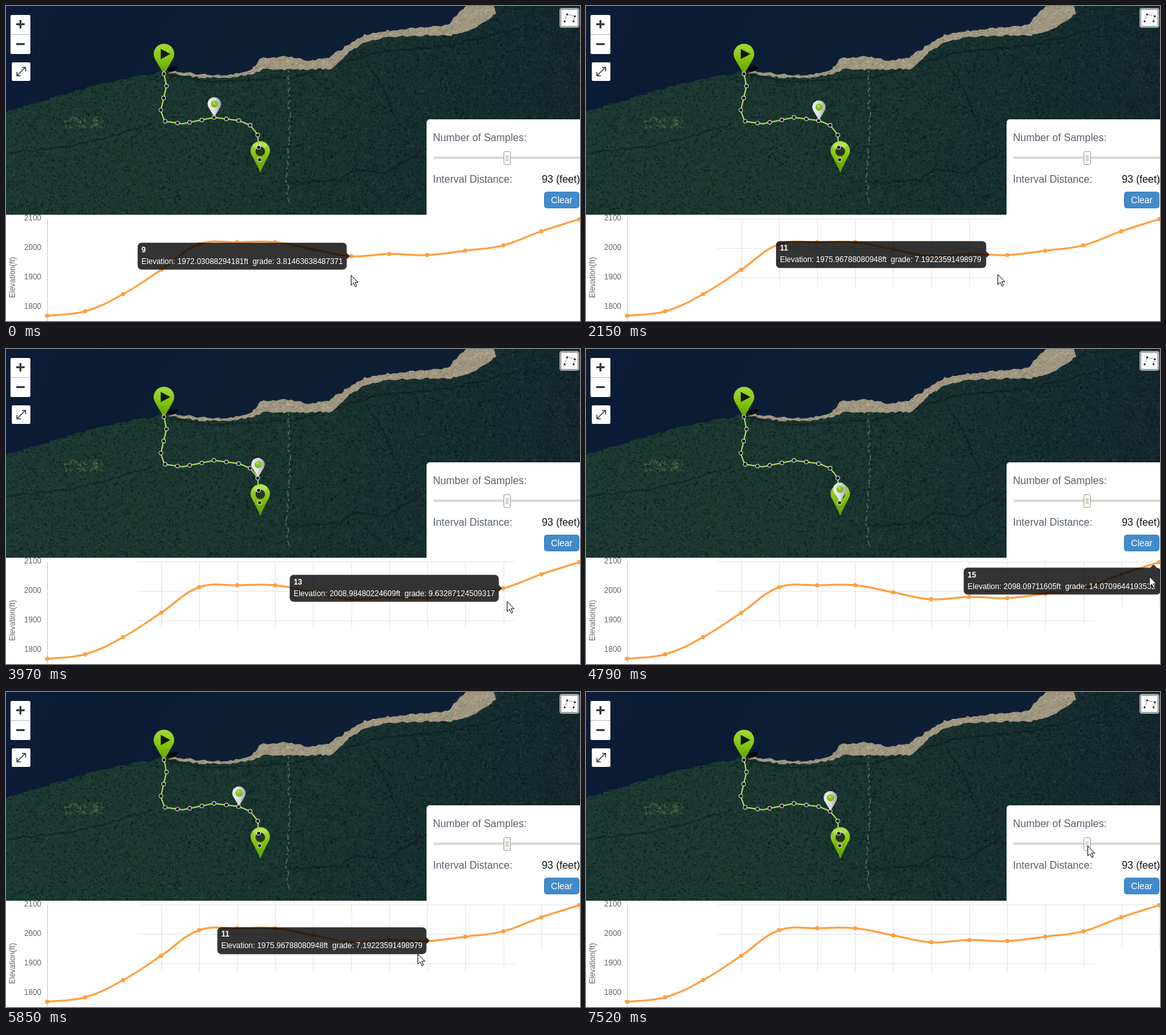
Animation, 894 px wide and 492 px high, one loop 8000 ms. Source, as an HTML page with a canvas:

```html
<!DOCTYPE html>
<html lang="en">
<head>
<meta charset="utf-8">
<title>Elevation profile</title>
<style>
html, body { margin: 0; width: 100%; height: 100%; overflow: hidden; background: #fff; }
canvas { display: block; }
</style>
</head>
<body>
<canvas id="stage" width="894" height="492"></canvas>
<script>
const W = 894, H = 492, MAP_H = 326, LOOP = 8000, LAG = 85, STEP = 140;
const AXIS_X = 64, GAP = 59.21;
const FONT = '"Liberation Sans", Arial, sans-serif';
const stage = document.getElementById('stage').getContext('2d');
let g = stage;

const mix = (a, b, k) => a + (b - a) * k;
const mixPoint = (a, b, k) => a.map((v, i) => mix(v, b[i], k));
const dist = (a, b) => Math.hypot(b[0] - a[0], b[1] - a[1]);
const easeOut = k => 1 - (1 - Math.min(1, Math.max(0, k))) ** 4;

// ---- data ----
const elevations = [1770, 1785, 1843.5, 1926, 2013, 2019.5, 2019.5, 1995.7,
  1972.03088294181, 1979.90482861552, 1975.96788080948, 1990.81366133233,
  2008.98480224609, 2056.84326171875, 2098.09711605];
const grades = ['3.81463638487371', '-1.90730595950382', '7.19223591498979', '8.78169881024901',
  '9.63287124509317', '13.2058417239641', '14.0709644193533'];
const levelY = v => 378 - (v - 2000) * 0.46;
const chart = elevations.map((v, i) => [AXIS_X + i * GAP, levelY(v)]);
const label = n => `Elevation: ${elevations[n - 1]}ft  grade: ${grades[n - 9]}`;

// Samples lie at equal distances along the track.
const track = [[246, 106], [250, 125], [241, 163], [247, 180], [275, 184], [324, 174],
  [363, 179], [380, 186], [392, 201], [395, 240]];
const route = sampleEvenly(track, elevations.length);

function sampleEvenly(pts, count) {
  const lengths = pts.slice(1).map((p, i) => dist(pts[i], p));
  const total = lengths.reduce((a, b) => a + b);
  return Array.from({ length: count }, (_, n) => {
    let left = total * n / (count - 1), i = 0;
    while (i < lengths.length - 1 && left > lengths[i]) left -= lengths[i++];
    return mixPoint(pts[i], pts[i + 1], left / lengths[i]);
  });
}

// ---- timeline ----
const bursts = [[1120, 2150], [2280, 3270], [3420, 4400], [4520, 5430], [5580, 6570], [6690, 7240], [7520, 7520]];
const cursorKeys = [[980, 537, 420], [2150, 641, 419], [3270, 737, 406], [4320, 800, 388],
  [4520, 866, 368], [4780, 877, 355], [5430, 778, 382], [5590, 680, 397], [5863, 641, 409],
  [6150, 546, 404], [6291, 566, 396], [6428, 648, 371], [6500, 735, 370], [6790, 745, 322],
  [7240, 775, 240], [7520, 781, 240]];

// The picture advances in even steps within a burst and rests between bursts.
function snap(t) {
  let s = 0;
  for (const [a, b] of bursts) {
    if (t < a) break;
    const d = (b - a) / Math.round((b - a) / STEP) || 1;
    s = Math.min(b, a + Math.floor((t - a) / d + 0.1) * d);
  }
  return s;
}

function cursorAt(t) {
  const i = cursorKeys.findIndex(k => k[0] > t);
  if (i <= 0) return cursorKeys.at(i).slice(1);
  const a = cursorKeys[i - 1], b = cursorKeys[i];
  return mixPoint(a, b, (t - a[0]) / (b[0] - a[0])).slice(1);
}

// The nearest sample follows the pointer a little late, until it leaves the chart.
const hovers = [];
let leaveAt = LOOP;
for (let t = -1000; t < LOOP; t += 5) {
  const [x, y] = cursorAt(t), n = Math.round((x - AXIS_X) / GAP) + 1;
  if (y < MAP_H) { leaveAt = t + LAG; break; }
  if (hovers.at(-1)?.[1] !== n) hovers.push([t + LAG, n]);
}

// ---- drawing helpers ----
let seed = 7;
const rnd = () => (seed = (seed * 16807) % 2147483647) / 2147483647;

function trace(pts, close) {
  g.beginPath();
  pts.forEach(p => g.lineTo(p[0], p[1]));
  if (close) g.closePath();
}
function fillPoly(pts, color) { trace(pts, true); g.fillStyle = color; g.fill(); }
function strokeLine(pts, color, width) {
  trace(pts); g.strokeStyle = color; g.lineWidth = width; g.stroke();
}
function disc(x, y, r, color) {
  g.beginPath(); g.arc(x, y, r, 0, 7); g.fillStyle = color; g.fill();
}
function box(x, y, w, h, r, fill, line) {
  g.beginPath(); g.roundRect(x, y, w, h, r);
  g.fillStyle = fill; g.fill();
  if (line) { g.strokeStyle = line; g.lineWidth = 1; g.stroke(); }
}
function text(s, x, y, color, size = 12, align = 'left', weight = '') {
  g.font = `${weight} ${size}px ${FONT}`;
  g.textAlign = align; g.fillStyle = color;
  g.fillText(s, x, y);
}
function gradient(x0, y0, x1, y1, ...colors) {
  const grad = g.createLinearGradient(x0, y0, x1, y1);
  colors.forEach((c, i) => grad.addColorStop(i / (colors.length - 1), c));
  return grad;
}
// Splits a line into short uneven pieces.
function rough(pts, amount) {
  const jitter = v => v + (rnd() - 0.5) * amount;
  return pts.slice(1).flatMap((b, i) => {
    const n = Math.ceil(dist(pts[i], b) / 5);
    return Array.from({ length: n }, (_, k) => mixPoint(pts[i], b, k / n).map(jitter));
  }).concat([pts.at(-1)]);
}
function speckle(n, [x, y, w, h], colors, size) {
  for (let i = 0; i < n; i++) {
    g.fillStyle = colors[i % colors.length];
    g.fillRect(x + rnd() * w, y + rnd() * h, 1 + rnd() * size, 1 + rnd() * size);
  }
}
function pin(x, y, r, tip, fill) {
  g.beginPath();
  g.arc(x, y, r, Math.PI * 0.87, Math.PI * 0.13);
  g.quadraticCurveTo(x + r * 0.55, y + r * 1.05, x, tip);
  g.quadraticCurveTo(x - r * 0.55, y + r * 1.05, x - r * Math.cos(0.41), y + r * Math.sin(0.41));
  g.fillStyle = fill; g.fill();
}
function spline(pts, tension) {
  const ctl = pts.map((p, i) => {
    const a = pts[i - 1] || p, b = pts[i + 1] || p, d0 = dist(a, p), d1 = dist(p, b);
    const at = k => [p[0] + k * (b[0] - a[0]), p[1] + k * (b[1] - a[1])];
    return { before: at(-tension * d0 / (d0 + d1)), after: at(tension * d1 / (d0 + d1)) };
  });
  g.beginPath(); g.moveTo(...pts[0]);
  for (let i = 1; i < pts.length; i++)
    g.bezierCurveTo(...ctl[i - 1].after, ...ctl[i].before, ...pts[i]);
}

// ---- still layers ----
function drawLand() {
  g.fillStyle = gradient(0, 0, 300, 170, '#0d1d37', '#0c1a34', '#0e1f35');
  g.fillRect(0, 0, W, MAP_H);

  // Each beach point is x, y and half its width.
  const beach = [[250, 102, 2], [300, 109, 2.5], [345, 111, 2.5], [384, 102, 3], [400, 90, 9], [440, 89, 10],
    [475, 92, 7], [505, 90, 8], [530, 69, 6], [560, 50, 5], [600, 43, 5], [650, 40, 6], [690, 38, 8],
    [720, 20, 18], [758, -6, 18]];
  const coast = rough([[0, 165], [60, 147], [150, 121], [225, 106], ...beach.map(p => p.slice(0, 2))], 4);

  g.save();
  trace([...coast, [W, -6], [W, MAP_H], [0, MAP_H]], true);
  g.fillStyle = gradient(0, 0, W, 0, '#1d3a33', '#1c3931', '#1a3530', '#17302f', '#14272e');
  g.fill(); g.clip();
  speckle(26000, [0, 0, W, MAP_H], ['rgba(4,16,22,.4)', 'rgba(62,94,74,.26)', 'rgba(8,24,26,.3)'], 2);
  [[[250, 107], [320, 119], [450, 111], [580, 72], [690, 62], [800, 35]],
    [[440, 275], [520, 272], [545, 253], [590, 262], [655, 222]],
    [[560, 86], [590, 130], [607, 176]],
    [[0, 230], [110, 218], [230, 184]]]
    .forEach(p => strokeLine(rough(p, 4), 'rgba(9,24,25,.45)', 2.5));
  speckle(100, [90, 172, 60, 18], ['rgba(105,120,76,.35)'], 3);
  g.setLineDash([4, 5, 9, 3]);
  strokeLine(rough([[440, 100], [442, 205], [437, 255], [440, 310]], 5), 'rgba(133,147,116,.6)', 1.5);
  g.setLineDash([]);
  g.restore();

  const edge = side => rough(beach.map(([x, y, w]) => [x + side * w * 0.3, y + side * w]), 3);
  g.save();
  trace([...edge(-1), ...edge(1).reverse()], true);
  g.fillStyle = '#a0967f'; g.fill(); g.clip();
  speckle(3000, [245, 0, 525, 118], ['rgba(196,187,166,.5)', 'rgba(98,98,84,.35)'], 2);
  g.restore();
}

function drawControls() {
  const ink = '#333b40';
  box(7, 14, 31, 61, 2, '#fff');
  g.fillStyle = '#b8bec2'; g.fillRect(7, 44, 31, 1);
  g.fillStyle = ink;
  g.fillRect(16, 27, 13, 3); g.fillRect(21, 22, 3, 13); g.fillRect(16, 58, 13, 3);
  box(9, 88, 29, 29, 2, '#fff');
  strokeLine([[17, 109], [30, 96]], ink, 1.5);
  strokeLine([[25, 96], [30.5, 96], [30.5, 102]], ink, 1.5);
  strokeLine([[17, 103], [17, 109], [23, 109]], ink, 1.5);

  box(862, 3, 31, 31, 4, '#a3a7a8');
  box(865, 6, 25, 25, 1, '#fff');
  const shape = [[870, 24], [874, 13], [886, 16], [884, 24]];
  g.setLineDash([2, 1]); strokeLine(shape, '#777', 1); g.setLineDash([]);
  shape.forEach(p => disc(...p, 1.5, '#222'));

  box(655, 177, 245, 149, [5, 0, 0, 0], '#fff');
  text('Number of Samples:', 665, 211, '#58616c', 16);
  text('Interval Distance:', 665, 276, '#58616c', 16);
  text('93 (feet)', 894, 276, '#111', 16, 'right');
  g.fillStyle = '#ded8d4'; g.fillRect(666, 235, 228, 4);
  box(838.5, 290.5, 54, 25, 4, '#428bca', '#357ebd');
  text('Clear', 865.5, 308, '#fff', 14, 'center');
}

function drawRoute() {
  const green = y => gradient(0, y - 16, 0, y + 32, '#a5d93a', '#83c40c', '#5d9d04');
  g.save();
  g.translate(252, 101); g.rotate(-0.35);
  g.beginPath(); g.ellipse(5, 0, 12, 4, 0, 0, 7);
  g.fillStyle = 'rgba(0,0,0,.75)'; g.fill();
  g.restore();
  strokeLine([...track, [396, 259]], '#b0dc55', 2);
  pin(246, 75, 16, 107, green(75));
  fillPoly([[241, 67], [241, 83], [256, 75]], '#10180a');
  pin(396, 226, 15, 260, green(226));
  g.beginPath(); g.ellipse(396, 218, 11, 5, 0, 0, 7);
  g.fillStyle = 'rgba(225,245,180,.35)'; g.fill();
  disc(396, 227, 7.5, '#26331f');
  route.forEach(p => { disc(...p, 3.4, '#eee'); disc(...p, 2.5, '#111'); });
}

function drawAxes() {
  g.fillStyle = '#c9c9c9'; g.fillRect(AXIS_X, 332, 1, 160);
  for (let v = 2100; v >= 1800; v -= 100) {
    const y = levelY(v);
    g.fillStyle = '#eee';
    chart.forEach(p => g.fillRect(Math.round(p[0]), y, 1, 1));
    text(v, 55, y + 3, '#666', 12, 'right');
  }
  g.save();
  g.translate(14, 424); g.rotate(-Math.PI / 2);
  text('Elevation(ft)', 0, 0, '#666', 12, 'center');
  g.restore();
}

function layer(draw) {
  const c = document.createElement('canvas');
  c.width = W; c.height = H;
  g = c.getContext('2d');
  draw();
  g = stage;
  return c;
}
const still = layer(() => {
  g.fillStyle = '#fff'; g.fillRect(0, 0, W, H);
  drawAxes();
  drawLand(); drawRoute(); drawControls();
});

// ---- moving parts ----
// Grid lines come into view only where the pointer has passed.
function drawGrid(t) {
  if (t < bursts[0][0]) return;
  const right = t > 4700 ? W : Math.max(531, cursorAt(t)[0] + 11);
  g.save();
  g.beginPath();
  [[205, 748, 439], [748, 792, 429], [792, W, 403]].forEach(([a, b, bottom]) => {
    if (right > a) g.rect(a, MAP_H, Math.min(b, right) - a, bottom - MAP_H);
  });
  g.clip();
  g.fillStyle = '#e5e5e5';
  [2100, 2000, 1900].forEach(v => g.fillRect(AXIS_X, levelY(v), W, 1));
  chart.forEach(p => g.fillRect(Math.round(p[0]), 332, 1, 160));
  g.restore();
}

function drawLine() {
  spline(chart, 0.4);
  g.strokeStyle = '#ff9f40'; g.lineWidth = 3; g.stroke();
  chart.forEach(p => disc(...p, 3.3, '#ff9f40'));
}

// Near the top edge the tip hangs below its point.
const hangs = n => chart[n - 1][1] < 360;

function tipTarget(n) {
  const [x, y] = chart[n - 1];
  g.font = `12px ${FONT}`;
  const w = g.measureText(label(n)).width + 12;
  return hangs(n) ? [x - w + 8, y + 7, w] : [x - 7 - w, y - 21, w];
}

function drawTip(t, n) {
  const alpha = 1 - easeOut((t - leaveAt) / 400);
  if (alpha < 0.01) return;
  let place = tipTarget(hovers[0][1]);
  hovers.forEach(([at, m], k) => {
    if (at > t) return;
    const end = Math.min(t, hovers[k + 1]?.[0] ?? t);
    place = mixPoint(place, tipTarget(m), easeOut((end - at) / 400));
  });
  const [x, y, w] = place, r = x + w;
  g.save();
  g.globalAlpha = alpha;
  g.beginPath();
  g.roundRect(x, y, w, 42, 6);
  const caret = hangs(n)
    ? [[r - 16, y], [r - 11, y - 5], [r - 6, y]]
    : [[r, y + 16], [r + 5, y + 21], [r, y + 26]];
  caret.forEach((p, k) => k ? g.lineTo(...p) : g.moveTo(...p));
  g.fillStyle = 'rgba(0,0,0,.8)'; g.fill();
  text(n, x + 6, Math.round(y + 15), '#fff', 12, 'left', 'bold');
  text(label(n), x + 6, Math.round(y + 33), '#fff');
  g.restore();
}

function drawSamplePin(n) {
  const [x, y] = route[n - 1], cy = y - 21;
  pin(x + 0.5, cy, 10.5, y - 1, gradient(x - 10, 0, x + 10, 0, '#f2f2f2', '#dedede', '#a9a9a9'));
  disc(x + 0.5, cy, 5.3, '#6aa50e');
  disc(x + 0.5, cy - 0.5, 4.4, '#86cb1c');
  disc(x - 0.5, cy - 2, 1.8, '#b5e45f');
}

function drawThumb(t) {
  box(775.5, 227.5, 10, 20, 1, t > 4300 && t < 7000 ? '#fffdf0' : '#fff', '#a09a96');
  g.fillStyle = '#8b8b8b';
  for (let y = 234; y <= 240; y += 3) g.fillRect(778, y, 5, 1);
}

function drawCursor([x, y]) {
  g.save();
  g.translate(Math.round(x) + 0.5, Math.round(y) + 0.5);
  trace([[0, 0], [0, 15.5], [3.6, 12], [6.4, 18], [8.8, 17], [6.1, 11.2], [11, 11.2]], true);
  g.fillStyle = '#fff'; g.fill();
  g.strokeStyle = '#111'; g.lineWidth = 1; g.stroke();
  g.restore();
}

function draw(now) {
  const t = snap(now % LOOP);
  const hovered = hovers.findLast(h => h[0] <= t)[1];
  g.drawImage(still, 0, 0);
  drawGrid(t);
  drawLine();
  drawSamplePin(hovered);
  drawThumb(t);
  drawTip(t, hovered);
  drawCursor(cursorAt(t));
}

const start = performance.now();
function tick() {
  draw(performance.now() - start);
  requestAnimationFrame(tick);
}
tick();
</script>
</body>
</html>
```
